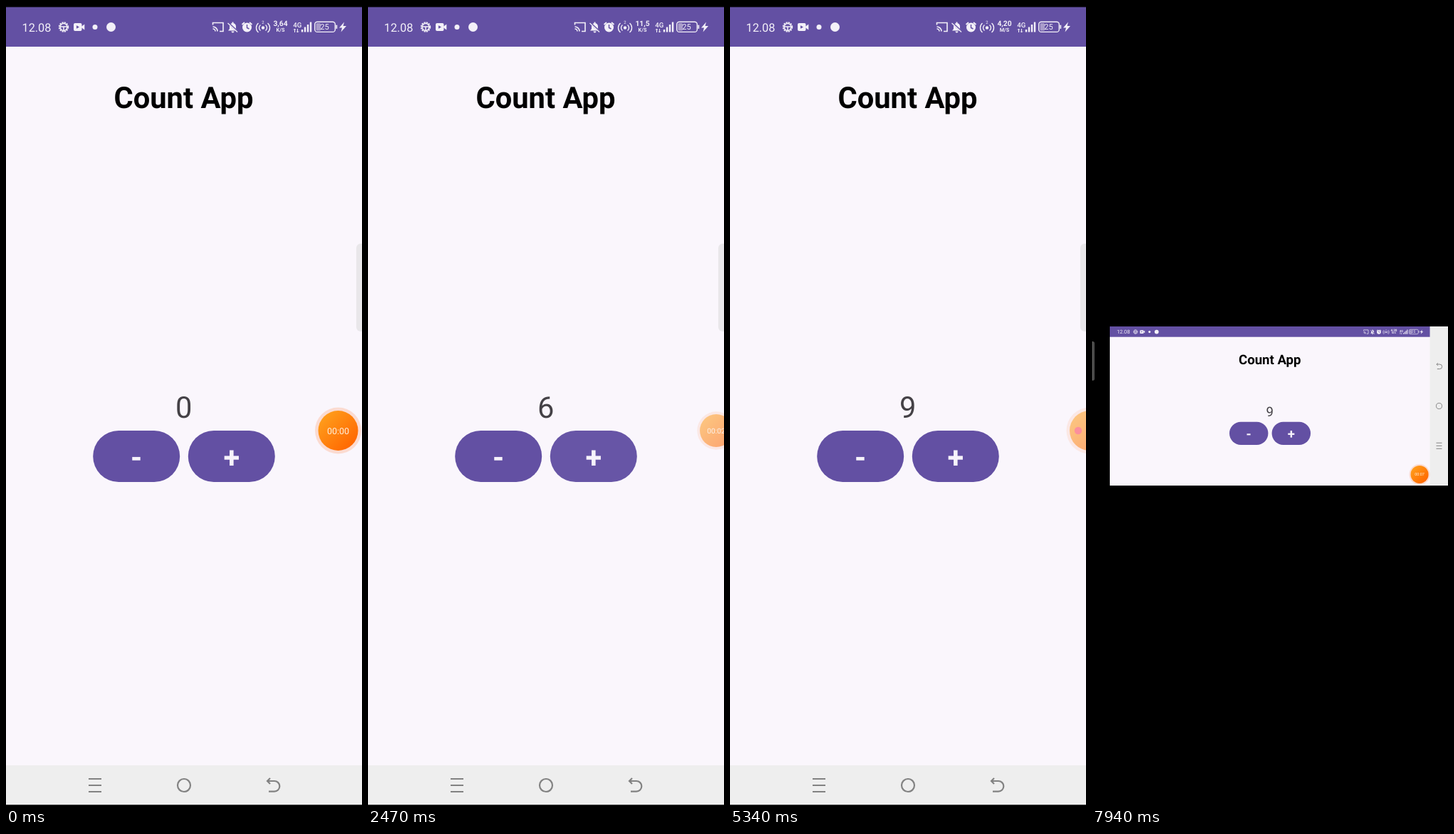
Animation, 500 px wide and 1121 px high, one loop 8000 ms. Source, as an HTML page:

```html
<!DOCTYPE html>
<html lang="en">
<head>
<meta charset="utf-8">
<title>Count App</title>
<style>
html, body { margin: 0; width: 100%; height: 100%; overflow: hidden; background: #000; }
svg { display: block; width: 100%; height: 100%; }
text { font-family: Roboto, sans-serif; text-rendering: geometricPrecision; }
</style>
</head>
<body>
<svg id="stage" viewBox="0 0 500 1121"></svg>
<script>
const LOOP = 8000, SCALE = 0.446;
const PURPLE = '#6350a3', PAPER = '#faf6fc', BAR = '#eeeeee', LIGHT = '#f3f0f8';
const TURN_OFF = 5870, ROTATE = 6280, ROTATE_MS = 300;
const plusTaps = [1500, ...Array.from({ length: 13 }, (_, i) => 1870 + i * 145)];
const minusTaps = Array.from({ length: 5 }, (_, i) => 3980 + i * 160);

const label = (x, y, size, str, attrs = '') =>
  `<text x="${x}" y="${y}" font-size="${size}" ${attrs}>${str}</text>`;
const mid = 'text-anchor="middle"';
const rect = (x, y, w, h, fill, rx = 0) =>
  `<rect x="${x}" y="${y}" width="${w}" height="${h}" rx="${rx}" fill="${fill}"/>`;
const group = (x, y, body) => `<g transform="translate(${x} ${y})">${body}</g>`;
const line = (d, w = 1.6) => `<path d="${d}" fill="none" stroke="${LIGHT}" stroke-width="${w}"/>`;

const statusLeft = () => `<g fill="${LIGHT}">
  ${label(22.5, 35.5, 16.3, '12.08')}
  <circle cx="81" cy="29.5" r="6.3" fill="none" stroke="${LIGHT}" stroke-width="1.8" stroke-dasharray="2.2 1.1"/>
  <circle cx="81" cy="29.5" r="4.9" fill="none" stroke="${LIGHT}" stroke-width="1.5"/>
  ${line('M76 29H86M81 29V34', 1.5)}
  ${rect(95, 24, 11.5, 11, LIGHT, 2)}<path d="M105 29.5L110.3 25.5V33.5Z"/>
  <path d="M99 27.2L103 29.5L99 31.8Z" fill="${PURPLE}"/>
  <circle cx="125" cy="29.5" r="3.5"/>
  <circle cx="147.5" cy="29.5" r="6.5"/></g>`;

const statusRight = () => `<g fill="${LIGHT}">
  ${line('M290.5 26.5V23.5H305V35.5H300M290.5 29a6.5 6.5 0 0 1 6.5 6.5M290.5 32a3.5 3.5 0 0 1 3.5 3.5')}
  <path d="M312 34.5L314 32V28.5a4.500 4.500 0 0 1 9 0V32L325 34.5ZM316.5 35.5h4a2 2 0 0 1-4 0ZM317.5 22.5h2v2h-2z"/>
  <path d="M312 23.5L325.5 36" stroke="${PURPLE}" stroke-width="2.4"/>${line('M311.5 24L325 36.5', 1.3)}
  <circle cx="338.5" cy="30" r="6.5"/>${line('M331.5 26L335 23M345.5 26L342 23', 1.8)}
  <path d="M338.5 26V30.5L341.5 32" fill="none" stroke="${PURPLE}" stroke-width="1.5"/>
  <circle cx="361" cy="30.5" r="2.2"/>
  ${line('M357.5 26.5a5 5 0 0 0 0 8M364.5 26.5a5 5 0 0 1 0 8M354.5 24a8.5 8.5 0 0 0 0 13M367.5 24a8.5 8.5 0 0 1 0 13', 1.4)}
  ${label(361, 25, 6, '2', mid)}
  ${label(385.5, 28, 10.3, '', mid + ' font-weight="700" class="speed"')}
  ${label(385.5, 35.5, 7.3, '', mid + ' font-weight="700" class="unit"')}
  ${label(403.2, 30, 9.6, '4G', 'font-weight="500"')}
  ${line('M405.5 37V32M404 33.5L405.5 32L407 33.5M409.5 32V37M408 35.5L409.5 37L411 35.5', 1)}
  ${[0, 1, 2, 3].map(i => rect(414.8 + i * 4, 33 - i * 3.5, 2.4, 3.5 + i * 3.5, LIGHT)).join('')}
  <rect x="433.7" y="22.2" width="28.6" height="14.2" rx="3.5" fill="none" stroke="${LIGHT}" stroke-width="1.4"/>
  ${rect(435.5, 24, 6.5, 10.6, '#a99cca', 1.5)}${rect(463.4, 26.5, 1.8, 5.5, LIGHT, 0.8)}
  ${label(447.5, 33.3, 11, '25', mid)}
  <path d="M475 22.5L468 30.5H472L470.5 36.5L478 28H473.5Z"/></g>`;

const title = () => label(249.4, 142.6, 41.67, 'Count App', mid + ' font-weight="700"');

const button = (x, sign, cls) => rect(x, 595, 122, 72, PURPLE, 36) +
  `<rect x="${x}" y="595" width="122" height="72" rx="36" fill="#fff" class="${cls}"/>` +
  label(x + 61, 646.5, 41.67, sign, mid + ' font-weight="700" fill="#f7f3fb"');

const counter = () => label(249.6, 577.2, 41.67, '0', mid + ' fill="#444146" class="count"') +
  button(122.2, '-', 'minusGlow') + button(255.8, '+', 'plusGlow');

const navIcon = {
  menu: 'M-9 -9H9M-9 0H9M-9 9H9',
  home: 'M-9 0a9 9 0 1 0 18 0a9 9 0 1 0 -18 0',
  back: 'M-4 -10L-8 -6L-4 -2M-8 -6H2a7.3 7.3 0 0 1 0 14.6H-6'
};
const nav = places => '<g fill="none" stroke-width="2.2" stroke="#828282">' +
  Object.entries(places).map(([k, [x, y]]) => group(x, y, `<path d="${navIcon[k]}"/>`)).join('') + '</g>';

const bubble = id => `<g id="${id}">
  <circle r="32.5" fill="#ff7a3a" opacity=".22"/><circle r="28" fill="url(#orange)"/>
  ${label(0, 4.5, 12.4, '', mid + ' fill="#fff1e0" class="clock"')}
  <circle cx="-16" r="5.2" fill="#ff3b4e" class="dot"/></g>`;

document.getElementById('stage').innerHTML = `<defs>
  <linearGradient id="orange" x1="0" y1="0" x2="1" y2="1">
    <stop offset=".1" stop-color="#ff9f1c"/><stop offset=".9" stop-color="#ff6500"/>
  </linearGradient>
  <clipPath id="screen"><rect width="500" height="1121"/></clipPath></defs>
<rect width="500" height="1121"/>
<g id="portrait"><g clip-path="url(#screen)">
  ${rect(0, 57, 500, 1008, PAPER)}${rect(0, 0, 500, 57, PURPLE)}${rect(0, 1064, 500, 57, BAR)}
  <g id="edges">${rect(0, 0, 500, 1.5, '#000')}${rect(0, 1119.3, 500, 2, '#000')}</g>
  ${statusLeft()}${statusRight()}${title()}${counter()}
  ${nav({ menu: [125, 1092], home: [250, 1092], back: [375, 1092] })}
  ${rect(492, 333, 20, 123, '#e9e7ea', 6)}
  ${bubble('bubble')}
</g></g>
<g id="landscape">
  ${rect(56, 0, 1009, 500, PAPER)}${rect(56, 0, 1009, 33, PURPLE)}${rect(1064, 0, 57, 500, BAR)}
  <g id="status">${group(56, -12.5, statusLeft())}${group(565, -12.5, statusRight())}</g>
  ${group(310.5, -24.5, title())}${group(310.5, -295, counter())}
  ${nav({ back: [1093, 125], home: [1093, 250], menu: [1093, 375] })}
  <path id="panel" d="M0 47h2a6 6 0 0 1 6 6v111a6 6 0 0 1 -6 6h-2z" fill="#f0f0ee"/>
  ${bubble('landBubble')}
</g>`;

const $ = id => document.getElementById(id);
const all = {};
for (const c of ['speed', 'unit', 'count', 'minusGlow', 'plusGlow', 'clock', 'dot'])
  all[c] = document.querySelectorAll('.' + c);
const write = (cls, str) => all[cls].forEach(e => { if (e.textContent !== str) e.textContent = str; });
const set = (e, attrs) => { for (const k in attrs) e.setAttribute(k, attrs[k]); };
const show = (e, on) => set(e, { display: on ? 'inline' : 'none' });
const ramp = (t, from, ms) => Math.min(1, Math.max(0, (t - from) / ms));
const done = (taps, t) => taps.filter(x => x <= t).length;

// Ripple brightness: quick rise just before a tap lands, slow fall after it.
const glow = (taps, t) => 0.03 * Math.max(...taps.map(x => ramp(t, x - 100, 100) * (1 - ramp(t, x, 500))));

function drawPortrait(t) {
  const off = t >= TURN_OFF;
  set($('portrait'), { transform: off ? `translate(0 672) rotate(-90) scale(${SCALE})` : '' });
  show($('edges'), !off);
  const p = 1 - (1 - ramp(t, 1340, 330)) ** 2, tucked = t >= 5340;
  const x = tucked ? 505 : 466.5 + 22.5 * p, s = tucked ? 1 : 1 - 0.18 * p;
  set($('bubble'), { transform: `translate(${x} 595) scale(${s})`, opacity: 1 - 0.45 * p });
}

function drawLandscape(t) {
  const q = (1 - ramp(t, ROTATE, ROTATE_MS)) ** 5;
  set($('landscape'), {
    transform: `translate(250 560.5) rotate(${-90 * q}) scale(${1 - 0.552 * q} ${1 + 1.23 * q}) scale(${SCALE}) translate(-560.5 -250)`
  });
  const fade = ramp(t, 6600, 200);
  set($('status'), { opacity: fade });
  set($('landBubble'), { opacity: fade, transform: 'translate(1031.5 465)' });
  set($('panel'), { opacity: 0.65 - 0.32 * ramp(t, 7680, 260) });
}

function draw(t) {
  const turned = t >= ROTATE - 10;
  show($('portrait'), !turned);
  show($('landscape'), turned);
  turned ? drawLandscape(t) : drawPortrait(t);

  write('count', String(done(plusTaps, t) - done(minusTaps, t)));
  all.plusGlow.forEach(e => set(e, { opacity: glow(plusTaps, t) }));
  all.minusGlow.forEach(e => set(e, { opacity: glow(minusTaps, t) }));
  write('speed', ['3,64', '11,5', '4,08', '4,20'][done([1450, 2900, 4350], t)]);
  write('unit', t < 4350 ? 'K/S' : 'M/S');

  const docked = t >= 5340 && !turned;
  const sec = turned ? (t < 7270 ? 6 : 7) : Math.floor((t + 330) / 1000);
  write('clock', docked ? '' : '00:0' + sec);
  all.dot.forEach(e => show(e, docked));
}

function tick() {
  draw(performance.now() % LOOP);
  requestAnimationFrame(tick);
}
tick();
</script>
</body>
</html>
```
